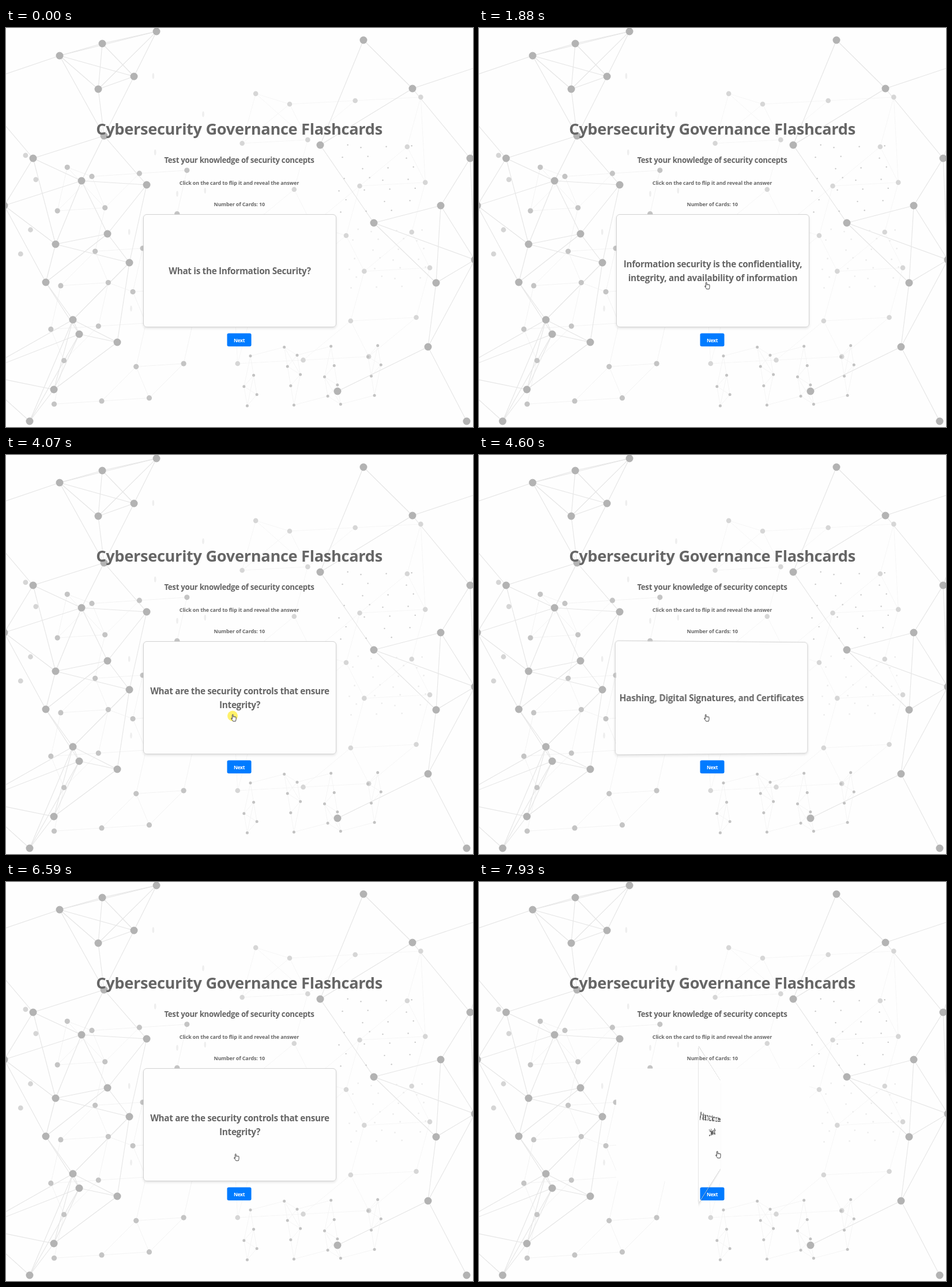
An HTML page for the animation above (7990 ms loop, 810x692 px).

```html
<!DOCTYPE html>
<html lang="en">
<head>
<meta charset="utf-8">
<title>Flashcards</title>
<style>
html, body { margin: 0; width: 100%; height: 100%; overflow: hidden; background: #fefefe; }
body { position: relative; font-family: "Open Sans", "Noto Sans", sans-serif; font-weight: 700; letter-spacing: -.02em; }
svg { position: absolute; left: 0; top: 0; width: 810px; height: 692px; }
text { text-anchor: middle; fill: #666; }
.note { font-size: 8.9px; letter-spacing: -.01em; }
.face {
  position: absolute; left: 238px; top: 323.3px; width: 335px; height: 195.7px; box-sizing: border-box;
  display: flex; align-items: center; justify-content: center; text-align: center;
  padding-top: 1.4px; white-space: pre; font-size: 15.3px; line-height: 23.4px; color: #666;
  border: 1px solid #d2d2d2; border-radius: 6px; box-shadow: 0 2px 4px rgba(0, 0, 0, .11);
}
</style>
</head>
<body>
<svg viewBox="0 0 810 692">
  <g id="net"></g>
  <rect x="238" y="323.5" width="335" height="195.5" rx="6" fill="#fefefe"/>
  <text x="404.5" y="184.6" font-size="27.2">Cybersecurity Governance Flashcards</text>
  <text x="404.5" y="234.2" font-size="13.3">Test your knowledge of security concepts</text>
  <text x="404.5" y="271.8" class="note">Click on the card to flip it and reveal the answer</text>
  <text x="404.7" y="308.6" class="note">Number of Cards: 10</text>
  <rect id="ring" x="381.7" y="527.7" width="45.6" height="26.4" rx="4" fill="#80bdff"/>
  <rect id="btn" x="383.5" y="529.5" width="42" height="22.8" rx="2.8"/>
  <text x="404.5" y="544.6" font-size="8.5" style="fill:#fff">Next</text>
</svg>
<div class="face" id="front"></div>
<div class="face" id="back"></div>
<svg viewBox="0 0 810 692">
  <g id="pointer">
    <circle id="press" cx="-2" cy="-3.5" r="9" fill="#fff05a" opacity=".9"/>
    <path id="hand" fill="#fff" stroke="#333" stroke-width=".9" stroke-linejoin="round"
      d="M-2.6 1.8V-5a.9.9 0 0 1 1.8 0V-1.6a.8.8 0 0 1 1.6.1a.8.8 0 0 1 1.6.2a.8.8 0 0 1 1.6.3V2.4Q3.9 4 3.2 5.8H-1.2Q-2 4.2-4.2 1.6q-.5-1.5.7-1.2Z"/>
    <path id="arrow" fill="#fff" stroke="#333" stroke-width=".8" d="M-3-6V4L-.7 2 1 6 2.6 5.3 .9 1.5H4Z"/>
  </g>
</svg>
<script>
const $ = id => document.getElementById(id);
const show = (el, on) => el.style.display = on ? '' : 'none';
const LOOP = 7990, FLIP = 600;

// ---- background network ----
// key nodes; those outside the stage only send lines in
const hubs = ('93,48 167,27 222,84 160,106 261,6 170,187 47,226 131,265 244,272 86,375 176,357 214,407 ' +
  '69,441 116,506 127,531 193,545 83,627 41,682 620,21 705,105 545,203 754,308 638,338 746,442 732,553 ' +
  '575,630 805,226 799,682 -3,308 813,402 -60,100 -50,600 870,50').split(' ').map(p => p.split(',').map(Number));

// count points spread evenly over a box by an additive recurrence
const scatter = (count, x, y, w, h) => Array.from({ length: count }, (_, i) =>
  [x + w * ((.5 + i * .7549) % 1), y + h * ((.5 + i * .5698) % 1)]);

function drawNet() {
  const lines = new Set();
  let dots = '';
  const dist = (a, b) => Math.hypot(a[0] - b[0], a[1] - b[1]);
  // each point joins its nearest neighbours
  const link = (list, k, reach, color, width) => list.forEach(a =>
    list.filter(b => b !== a && dist(a, b) < reach)
      .sort((b, c) => dist(a, b) - dist(a, c)).slice(0, k)
      .forEach(b => {
        const [p, q] = a[0] < b[0] ? [a, b] : [b, a];
        lines.add(`<path d="M${p}L${q}" stroke="${color}" stroke-width="${width}"/>`);
      }));
  const dot = (list, r, color, ry = r) => list.forEach(([x, y]) =>
    dots += `<ellipse cx="${x}" cy="${y}" rx="${r}" ry="${ry}" fill="${color}"/>`);

  const left = scatter(24, 75, 225, 290, 465);
  const right = scatter(24, 390, 95, 400, 530);
  const low = scatter(22, 410, 545, 285, 120);
  const tiny = scatter(24, 576, 198, 155, 132);
  link(right, 3, 150, '#f4f4f4', .8);
  link(left, 3, 120, '#f0f0f0', .8);
  link(low, 3, 75, '#f3f3f3', .8);
  link(hubs, 4, 215, '#e5e5e5', 1.1);
  dot(scatter(26, 594, 345, 155, 115), 1.4, '#ececec');
  dot(scatter(8, 212, 50, 170, 475), 1.8, '#eeeeee', 5);
  dot(tiny, 1.2, '#c9c9c9');
  dot(scatter(4, 25, 200, 35, 300), 4.4, '#d5d5d5');
  dot(right, 4.3, '#d6d6d6');
  dot(low, 2.5, '#c2c2c2');
  dot(left, 4.6, '#c4c4c4');
  dot(hubs, 6.5, '#b3b3b3');
  $('net').innerHTML = [...lines].join('') + dots;
}

// ---- story ----
const ask = 'What are the security controls that ensure\n';
const cards = [
  ['What is the Information Security?', 'Information security is the confidentiality,\nintegrity, and availability of information'],
  [ask + 'Integrity?', 'Hashing, Digital Signatures, and Certificates'],
  [ask + 'Confidentiality?', '']
];
// press, release, target
const clicks = [
  [1150, 1200, 'card'], [2340, 2380, 'card'], [3410, 3480, 'next'], [4020, 4099, 'card'],
  [5060, 5110, 'card'], [6930, 7060, 'next'], [7650, 7764, 'card']
];
// pointer glides: from, until, to x, to y
const home = [776, 684];
const glides = [
  [350, 850, 373, 455], [850, 1020, 391, 448], [1800, 1880, 396, 447], [2400, 2640, 407, 450],
  [2670, 3210, 405, 541], [3530, 3900, 395, 456], [5700, 5800, 400, 470], [6560, 6590, 400, 477.5],
  [6620, 6800, 405, 540], [7120, 7450, 415, 473]
];

const clamp = x => Math.min(1, Math.max(0, x));
const smooth = x => x * x * (3 - 2 * x);

// cubic-bezier(.25, .1, .25, 1)
function ease(x) {
  const curve = (a, b, s) => 3 * a * s * (1 - s) ** 2 + 3 * b * s * s * (1 - s) + s ** 3;
  let lo = 0, hi = 1;
  for (let i = 0; i < 24; i++) {
    const m = (lo + hi) / 2;
    if (curve(.25, .25, m) < x) lo = m; else hi = m;
  }
  return x >= 1 ? 1 : curve(.1, 1, lo);
}

// replay the clicks up to time t
function stateAt(t) {
  const s = { card: 0, turn: 0, pressed: false, focus: false };
  let flipped = false;
  for (const [down, up, target] of clicks) {
    if (t < down) break;
    s.pressed = t < up + 30;
    s.focus = target === 'next';
    if (t < up) break;
    if (target === 'next') { s.card++; continue; }
    flipped = !flipped;
    const k = ease((t - up) / FLIP);
    s.turn = flipped ? k : 1 - k;
  }
  return s;
}

function pointerAt(t) {
  let [x, y] = home;
  for (const [from, until, toX, toY] of glides) {
    const k = smooth(clamp((t - from) / (until - from)));
    x += (toX - x) * k;
    y += (toY - y) * k;
  }
  return [x, y];
}

function setFace(el, text, angle) {
  if (el.textContent !== text) el.textContent = text;
  show(el, angle < 90);
  el.style.transform = angle < .01 ? 'none' : `perspective(575px) rotateY(${angle}deg)`;
}

function render(t) {
  t = Math.min(t, 7930); // the last pose holds
  const s = stateAt(t);
  const [question, answer] = cards[s.card];
  setFace($('front'), question, 180 * s.turn);
  setFace($('back'), answer, 180 * (1 - s.turn));

  const [x, y] = pointerAt(t);
  const over = (left, top, w, h) => x - 2 > left && x - 2 < left + w && y - 5 > top && y - 5 < top + h;
  const onButton = over(383, 529, 43, 24);
  const active = onButton || over(238, 323, 335, 196);
  $('pointer').setAttribute('transform', `translate(${x} ${y})`);
  show($('pointer'), t >= glides[0][0]);
  show($('hand'), active);
  show($('arrow'), !active);
  show($('press'), s.pressed);
  show($('ring'), s.focus);
  $('btn').setAttribute('fill', onButton ? '#0069d9' : '#007bff');
}

drawNet();
const start = performance.now();
function tick() {
  render((performance.now() - start) % LOOP);
  requestAnimationFrame(tick);
}
tick();
</script>
</body>
</html>
```
